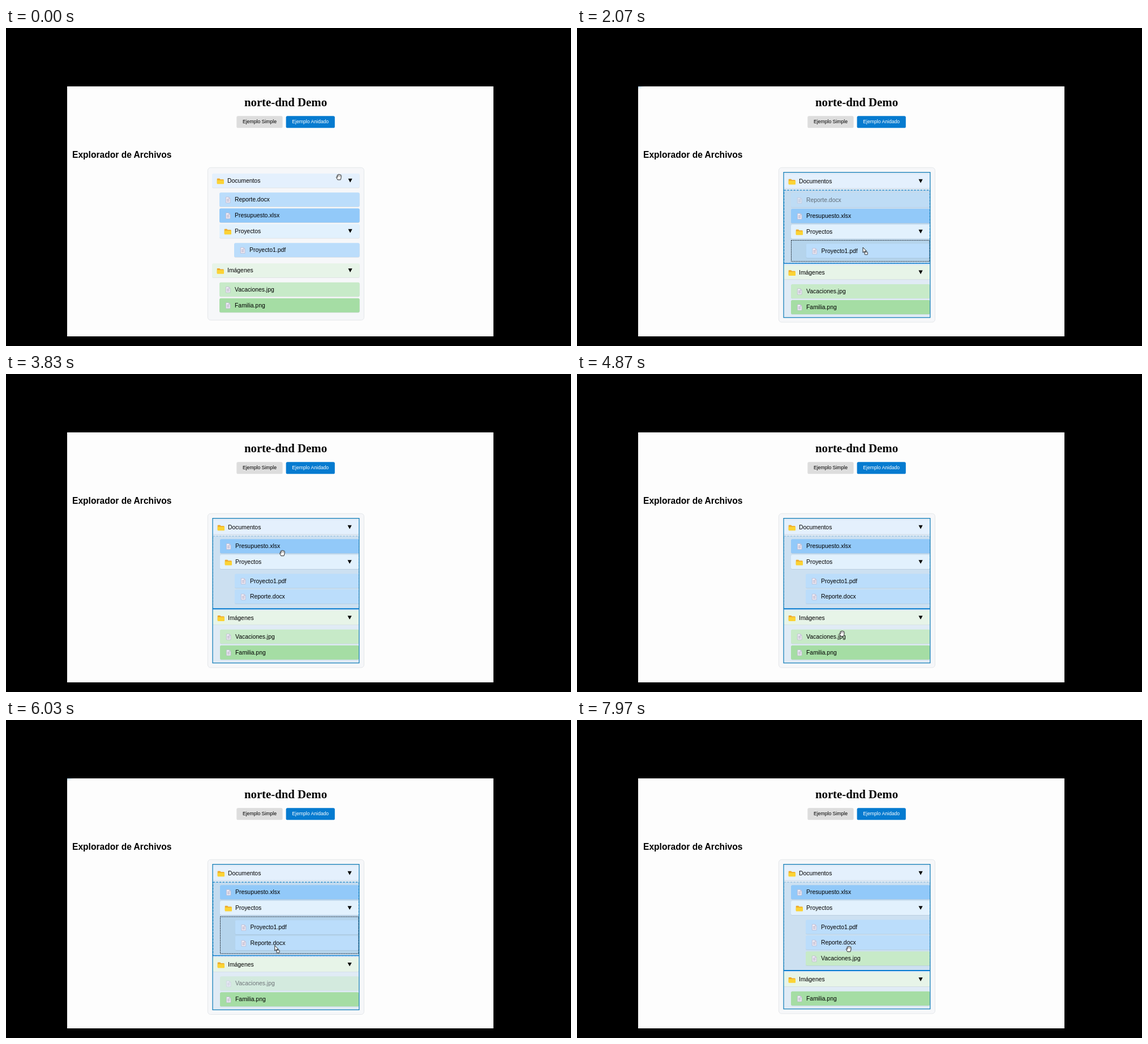
These frames come from a looping animation (998x561 px, 8 s). An HTML page:

```html
<!DOCTYPE html>
<html lang="es">
<head>
<meta charset="utf-8">
<title>Explorador de Archivos</title>
<style>
html, body { margin: 0; width: 100%; height: 100%; overflow: hidden; background: #000; }
svg { display: block; width: 100%; height: 100%; }
text { font: 10.4px "Liberation Sans", Arial, sans-serif; fill: #000; }
.title { font: bold 20.8px "Liberation Serif", Times, serif; text-anchor: middle; }
.head { font-size: 15.6px; font-weight: bold; }
.btn { font-size: 8.67px; text-anchor: middle; }
</style>
</head>
<body>
<svg viewBox="0 0 998 561">
  <defs>
    <radialGradient id="glow" cx="0" cy="0" r="1">
      <stop offset="0" stop-color="#7fb4dc" stop-opacity=".7"/>
      <stop offset="1" stop-color="#bbdefb" stop-opacity="0"/>
    </radialGradient>
    <g id="folder">
      <path d="M9.5 -3.6h3.8l1.2 1.5h5.3q.8 0 .8 .8v6h-11.9v-7.5q0-.8 .8-.8z" fill="#eeaa2b"/>
      <path d="M8.7 .2q0-.8 .8-.8h10.7q.8 0 .8 .8v5.2q0 .8-.8 .8h-10.7q-.8 0-.8-.8z" fill="#fbd335"/>
    </g>
    <g id="file">
      <path d="M11.4 -4.2h5.2l2.4 2.4v7.6h-7.6z" fill="#f1f0f8" stroke="#b8b2cb" stroke-width=".7"/>
      <path d="M16.6 -4.2v2.4h2.4" fill="#d5cfe3" stroke="#b8b2cb" stroke-width=".6"/>
      <path d="M12.8 -.6h4.6M12.8 1.3h4.6M12.8 3.2h4.6" stroke="#9c8fae" stroke-width=".7"/>
    </g>
  </defs>
  <rect x="108" y="103" width="753" height="441" fill="#fdfdfd"/>
  <text class="title" x="494" y="137.5">norte-dnd Demo</text>
  <rect x="407.3" y="155.3" width="81.3" height="21" rx="2.6" fill="#ddd"/>
  <text class="btn" x="448" y="168.4">Ejemplo Simple</text>
  <rect x="494.6" y="155.3" width="86.2" height="21" rx="2.6" fill="#067bd0"/>
  <text class="btn" x="537.7" y="168.4" style="fill:#fff">Ejemplo Anidado</text>
  <text class="head" x="117" y="229">Explorador de Archivos</text>
  <path id="ghost" d="M108 103h12v5h-12z" fill="url(#glow)"/>
  <rect id="panel" x="356.4" y="246.3" width="276" fill="#f6f7f9" stroke="#dfe2e6" stroke-width=".8" rx="5"/>
  <g id="zones"></g>
  <g id="rows"></g>
  <g id="edges"></g>
  <g id="hand" fill="#fff" stroke="#111" stroke-width=".9" stroke-linejoin="round">
    <path d="M-2.2 4.8L-4.4 .8q-.5-1.2 .5-1.3q.7 0 1.5 1.1L-3.2-2.6q-.1-1 .7-1.1q.8 0 1 1l.2-1.3q.2-.9 1-.9q.8 0 .9 1q.4-.8 1.1-.7q.8 .1 .8 1.2q.4-.6 1-.4q.7 .2 .7 1.2q0 2.8-.5 4.6l-.8 2.8z"/>
    <path d="M-1.4-2.6v2M.6-3.4v2.8M2.5-2.8v2.2" fill="none" stroke-width=".5"/>
  </g>
  <g id="point" fill="#fff" stroke="#111" stroke-width=".9" stroke-linejoin="round">
    <path d="M-1.8 5.2L-4 1.6q-.6-1.1 .4-1.3q.8 0 1.5 1v-5.5q0-1 .9-1q.9 0 .9 1v3.3q1.5-.5 1.9 .4q1.2-.4 1.5 .5q1.1-.2 1.1 .9q0 2.4-.9 4.3z"/>
  </g>
  <g id="arrow" fill="#fff" stroke="#111" stroke-width=".9" stroke-linejoin="round">
    <path d="M0 0v9.2l2.2-1.9l1.5 3.3l1.5-.7l-1.5-3.2h2.9z"/>
    <rect x="3.1" y="8.2" width="5.2" height="4.6" rx=".6" fill="#e9eef3" stroke-width=".8"/>
  </g>
</svg>
<script>
const $ = id => document.getElementById(id);
const NS = 'http://www.w3.org/2000/svg';
const BLUE = '#067bd0';

function add(parent, tag, attrs, text) {
  const el = document.createElementNS(NS, tag);
  for (const k in attrs) el.setAttribute(k, attrs[k]);
  if (text) el.textContent = text;
  parent.appendChild(el);
  return el;
}

// key: [label, colour, is folder]
const items = {
  D: ['Documentos', '#e4f0fd', 1],
  R: ['Reporte.docx', '#bbddfb'],
  P: ['Presupuesto.xlsx', '#92c9f9'],
  J: ['Proyectos', '#e2f1fd', 1],
  Q: ['Proyecto1.pdf', '#bbddfb'],
  I: ['Imágenes', '#e7f4e8', 1],
  V: ['Vacaciones.jpg', '#c7eac8'],
  F: ['Familia.png', '#a5dda4']
};
const keys = Object.keys(items);

// y: row centres in key order; nest: rows inside Proyectos
const views = {
  rest:  { y: [269, 302.5, 330.5, 358, 391.5, 427.5, 461, 489], end: 515.3, nest: 'Q' },
  lift:  { y: [270, 303.7, 331.7, 359.4, 392.8, 429, 462.6, 490.6], end: 517.4, nest: 'Q', root: 1, docs: 'black', fade: 'R' },
  over:  { y: [270, 303.4, 331.4, 359, 393, 430.8, 464.2, 492.2], end: 519, nest: 'Q', root: 1, docs: 'deep', sub: 'black', fade: 'R' },
  moved: { y: [270, 392.5, 303.5, 331.4, 364.8, 429.7, 463, 491], end: 518, nest: 'QR', root: 1, docs: 'stale' },
  lift2: { y: [269, 391.5, 302.5, 330.4, 363.8, 428.7, 462.6, 490.6], end: 517.4, nest: 'QR', docs: 'stale', imgs: 'black', fade: 'V' },
  out2:  { y: [270, 392.5, 303.5, 331.4, 364.8, 429.7, 463, 491], end: 518, nest: 'QR', root: 1, docs: 'stale', fade: 'V' },
  over2: { y: [270, 393.3, 303.5, 331.4, 365.5, 431.2, 464.6, 492.6], end: 519.5, nest: 'QR', root: 1, docs: 'deep', sub: 'black', fade: 'V' },
  drop2: { y: [270, 392.5, 303.5, 331.4, 364.8, 457.5, 420.5, 491], end: 518, nest: 'QRV', root: 1, docs: 'stale', sub: 'soft' },
  done:  { y: [270, 392.5, 303.5, 331.4, 364.8, 457.5, 420.5, 491], end: 518, nest: 'QRV', root: 1, docs: 'stale' }
};

const zoneLook = {
  black: { tint: .07, line: '#101820', w: .9, dash: '2 1' },
  deep:  { tint: .13, line: '#1684c8', w: 1.2, dash: '3.6 2', base: 1.3 },
  stale: { tint: .09, line: '#86b4d8', w: 1, dash: '3.6 2', base: 2 },
  soft:  { tint: .1, line: '#a9c6e4', w: .7, dash: '3 2' }
};

const scenes = [
  [0, 'rest'], [1430, 'lift'], [1860, 'over'], [2500, 'moved'], [5270, 'lift2'],
  [5640, 'out2'], [5880, 'over2'], [6560, 'drop2'], [6910, 'done']
];

// time, x, y, cursor shape
const path = [
  [0, 588, 263, 'hand'], [30, 588, 263, 'hand'], [170, 535, 288, 'hand'], [670, 535, 288, 'hand'],
  [800, 512, 300, 'hand'], [1200, 512, 300, 'hand'], [1230, 501, 308, 'hand'],
  [1430, 499, 314, 'arrow'], [1470, 499, 322, 'arrow'], [1860, 503, 374, 'arrow'],
  [2070, 505, 387, 'arrow'], [2230, 506, 390, 'arrow'],
  [2500, 505, 393, 'hand'], [2800, 492, 396, 'hand'], [3600, 492, 396, 'hand'], [3830, 488, 316, 'hand'],
  [4300, 488, 316, 'hand'], [4370, 490, 450, 'hand'], [4830, 490, 450, 'hand'], [4870, 468, 458, 'hand'],
  [5270, 465, 453, 'arrow'], [5570, 463, 451, 'arrow'], [5880, 470, 405, 'arrow'], [6070, 476, 396, 'arrow'],
  [6560, 481, 398, 'point'], [6730, 482, 399, 'point'], [6910, 482, 400, 'hand'],
  [7970, 480, 404, 'hand'], [8000, 480, 404, 'hand']
];

function zone(kind, x1, y1, x2, y2) {
  if (!kind) return;
  const z = zoneLook[kind], w = x2 - x1, h = y2 - y1;
  add($('zones'), 'rect', { x: x1, y: y1, width: w, height: h, fill: '#0070c8', 'fill-opacity': z.tint });
  add($('edges'), 'rect', { x: x1, y: y1, width: w, height: h, fill: 'none',
    stroke: z.line, 'stroke-width': z.w, 'stroke-dasharray': z.dash });
  if (z.base) base(x1, x2, y2, z.base);
}

function base(x1, x2, y, w) {
  add($('edges'), 'path', { d: `M${x1 - .4} ${y}H${x2 + .4}`, stroke: BLUE, 'stroke-width': w });
}

function row(key, c, v) {
  const [label, color, folder] = items[key];
  const nested = v.nest.includes(key), shift = v.root ? 1 : 0;
  const x = (nested ? 403 : 'DI'.includes(key) ? 364 : 377) + shift + (nested && v.sub === 'black' ? .6 : 0);
  const right = 624.6 - shift;
  const g = add($('rows'), 'g', { transform: `translate(${x} ${c})`, opacity: v.fade === key ? .5 : 1 });
  const size = { x: 0, width: right - x, height: 25, rx: 2.6 };
  add(g, 'rect', { ...size, y: -11.6, fill: '#203040', 'fill-opacity': .12 });
  add(g, 'rect', { ...size, y: -12.3, fill: color });
  add(g, 'use', { href: folder ? '#folder' : '#file' });
  add(g, 'text', { x: 27, y: 3.8 }, label);
  if (folder) add(g, 'path', { d: `M${604.4 - shift - x} -3.2h7.2l-3.6 6.6z` });
}

function draw(name) {
  const v = views[name];
  for (const id of ['zones', 'rows', 'edges']) $(id).textContent = '';
  $('panel').setAttribute('height', v.end - 246.3);
  const at = k => v.y[keys.indexOf(k)];
  const bottom = v.end - 8.2;
  const box = { x: 365, y: 254.6, width: 258.8, height: bottom - 254.6 };
  if (v.root) add($('zones'), 'rect', { ...box, fill: '#0070c8', 'fill-opacity': .09 });
  const left = v.root ? 365.6 : 364.6, right = v.root ? 623.4 : 624;
  zone(v.docs, left, at('D') + 16.1, right, at('I') - 15.5);
  zone(v.sub, 378.5, at('J') + 15.6, 622.8, at('I') - 19);
  zone(v.imgs, left, at('I') + 15.5, right, bottom + .3);
  if (v.imgs) base(left, right, bottom + .3, 2);
  keys.forEach((k, i) => row(k, v.y[i], v));
  if (v.root) add($('edges'), 'rect', { ...box, fill: 'none', stroke: '#0879b6', 'stroke-width': 1.2 });
  $('ghost').style.display = v.fade ? '' : 'none';
}

function moveCursor(t) {
  let i = 0;
  while (i < path.length - 2 && path[i + 1][0] <= t) i++;
  const a = path[i], b = path[i + 1];
  const k = a[3] === b[3] ? (t - a[0]) / (b[0] - a[0]) : 0;
  const x = a[1] + (b[1] - a[1]) * k, y = a[2] + (b[2] - a[2]) * k;
  for (const id of ['hand', 'arrow', 'point']) $(id).style.display = id === a[3] ? '' : 'none';
  $(a[3]).setAttribute('transform', `translate(${x} ${y})`);
}

let shown;
const start = performance.now();
function tick() {
  const t = Math.max(0, performance.now() - start) % 8000;
  const name = scenes.filter(s => s[0] <= t).pop()[1];
  if (name !== shown) draw(shown = name);
  moveCursor(t);
  requestAnimationFrame(tick);
}
tick();
</script>
</body>
</html>
```
